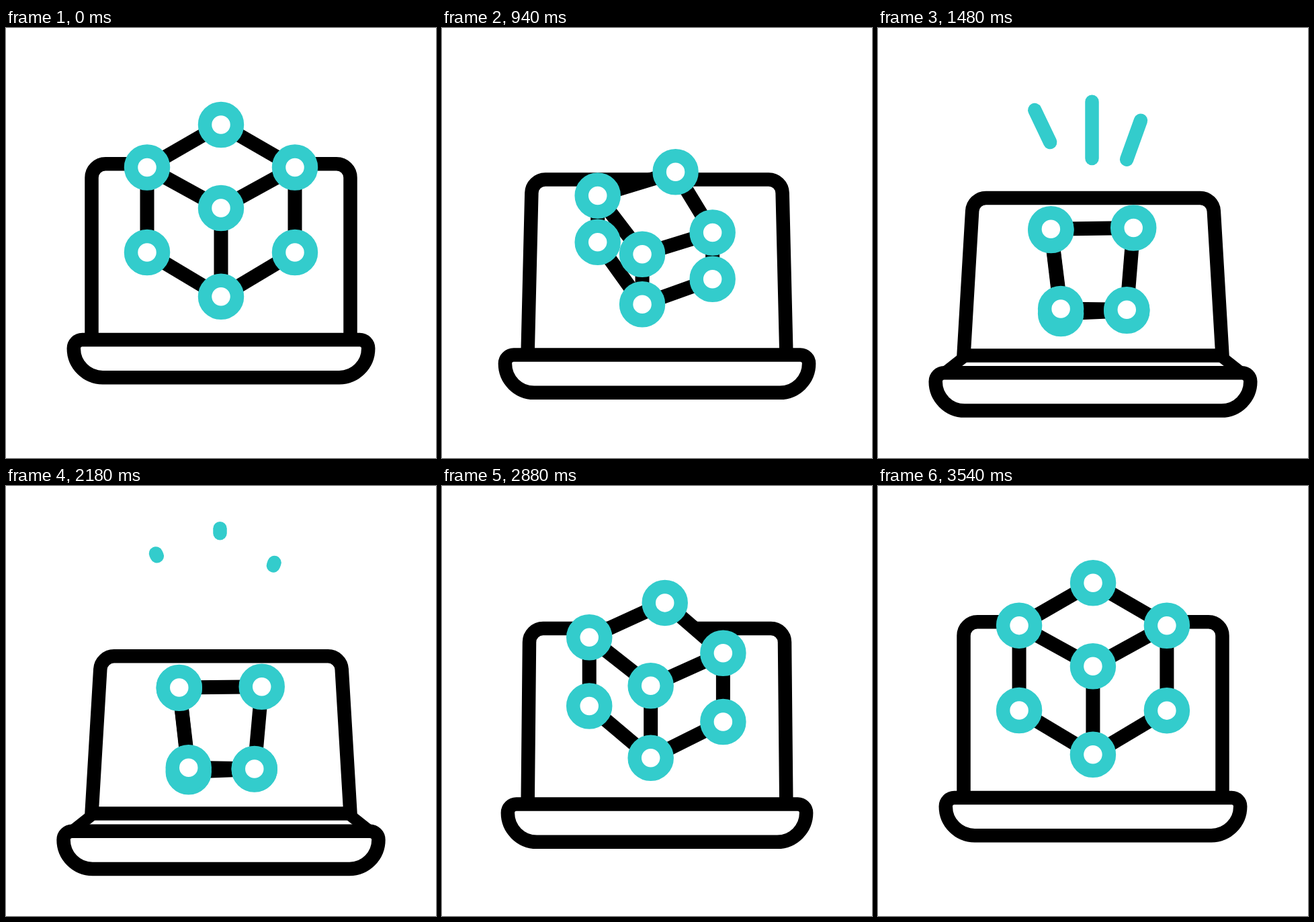
Write an HTML page with a canvas that moves like this. It is 640 by 640 pixels and loops after 3600 ms.

```html
<!DOCTYPE html>
<html lang="en">
<head>
<meta charset="utf-8">
<title>Laptop and cube network</title>
<style>
html, body { margin: 0; width: 100%; height: 100%; overflow: hidden; background: #fff; }
canvas { display: block; width: 640px; height: 640px; }
</style>
</head>
<body>
<canvas id="stage" width="640" height="640"></canvas>
<script>
const ctx = document.getElementById('stage').getContext('2d');
const LOOP = 3600, TURN = 1850, W = 20.5, TEAL = '#33cccc';

// Key poses of the tilt: [ms, amount]; the way back mirrors them at TURN
const KEYS = [
  [100, 0], [540, .057], [620, .0905], [820, .193],
  [940, .45], [1080, .757], [1480, .987], [TURN, 1.036]
];

// Rays: from x, y, to x, y, start time
const RAYS = [
  [256.3, 170.3, 223, 100.5, 1064],
  [318.5, 194.5, 318.5, 63.2, 1100],
  [370, 196, 399.5, 114, 1046]
];

const mix = (a, b, k) => a + (b - a) * k;
const clamp = v => Math.min(1, Math.max(0, v));
const smooth = u => u * u * (3 - 2 * u);

// Monotone cubic through the key poses
const slope = i => (KEYS[i + 1][1] - KEYS[i][1]) / (KEYS[i + 1][0] - KEYS[i][0]);
const tangents = KEYS.map((_, i) => {
  if (i === 0 || i === KEYS.length - 1) return 0;
  const a = slope(i - 1), b = slope(i);
  return 2 * a * b / (a + b);
});

function tiltAt(time) {
  const t = Math.max(KEYS[0][0], TURN - Math.abs(time - TURN));
  let i = 0;
  while (i < KEYS.length - 2 && t >= KEYS[i + 1][0]) i++;
  const [t0, v0] = KEYS[i], [t1, v1] = KEYS[i + 1];
  const d = t1 - t0, u = (t - t0) / d, w = 1 - u;
  return mix(v0, v1, smooth(u)) + d * u * w * (w * tangents[i] - u * tangents[i + 1]);
}

function line(x0, y0, x1, y1, width = W) {
  ctx.lineWidth = width;
  ctx.beginPath();
  ctx.moveTo(x0, y0);
  ctx.lineTo(x1, y1);
  ctx.stroke();
}

function laptop(p) {
  const lidX = mix(127.5, 141.5, p), lidY = mix(202.2, 253.6, p);
  const x = mix(100.8, 85.5, p), y = mix(464, 514, p);
  const hinge = 487.5, foot = y + 56.2;

  ctx.strokeStyle = '#000';
  ctx.lineCap = 'butt';
  line(128, 490, x + 12.5, y, 17);
  line(512, 490, 627.5 - x, y, 17);

  ctx.lineWidth = W;
  ctx.beginPath();
  ctx.moveTo(127.5, hinge);
  ctx.arcTo(lidX, lidY, 320, lidY, 20.5);
  ctx.arcTo(640 - lidX, lidY, 512.5, hinge, 20.5);
  ctx.lineTo(512.5, hinge);
  ctx.closePath();
  ctx.stroke();

  ctx.fillStyle = '#fff';
  ctx.beginPath();
  ctx.moveTo(320, y);
  ctx.arcTo(640 - x, y, 640 - x, foot, 12.8);
  ctx.arcTo(640 - x, foot, 320, foot, 43.2);
  ctx.arcTo(x, foot, x, y, 43.2);
  ctx.arcTo(x, y, 320, y, 12.8);
  ctx.closePath();
  ctx.fill();
  ctx.stroke();
}

function node(x, y) {
  ctx.beginPath();
  ctx.arc(x, y, 24, 0, 2 * Math.PI);
  ctx.fill();
  ctx.stroke();
}

// The cube is its upper face plus three corners straight below it
function cube(p) {
  const at = (x0, y0, x1, y1) => [mix(x0, x1, p), mix(y0, y1, p)];
  const top = at(320, 144, 381, 299.5);
  const left = at(210, 207.5, 258, 300.5);
  const right = at(430, 207.5, 369.5, 422);
  const centre = at(320, 268, 271.5, 420);
  const below = ([x, y], extra = 0) => [x, y + 126.5 * (1 - p) + extra];
  const face = [left, top, right, centre];
  const lower = [below(left), below(centre, 5.3), below(right)];

  ctx.fillStyle = '#fff';
  ctx.beginPath();
  for (const point of [left, top, right, ...lower.slice().reverse()]) ctx.lineTo(...point);
  ctx.fill();

  ctx.strokeStyle = '#000';
  const link = (a, b) => line(...a, ...b, 21);
  face.forEach((point, i) => link(point, face[(i + 1) % 4]));
  [left, centre, right].forEach((point, i) => link(point, lower[i]));
  link(lower[0], lower[1]);
  link(lower[1], lower[2]);

  ctx.strokeStyle = TEAL;
  ctx.lineWidth = W;
  for (const point of [...lower, ...face]) node(...point);
}

function rays(t) {
  const tail = smooth(clamp((t - 1450) / 850));
  ctx.strokeStyle = TEAL;
  ctx.lineCap = 'round';
  for (const [x0, y0, x1, y1, start] of RAYS) {
    const head = 1 - (1 - clamp((t - start) / 940)) ** 2;
    if (head <= tail) continue;
    line(mix(x0, x1, tail), mix(y0, y1, tail), mix(x0, x1, head), mix(y0, y1, head));
  }
}

function draw(t) {
  const p = tiltAt(t);
  ctx.fillStyle = '#fff';
  ctx.fillRect(0, 0, 640, 640);
  laptop(p);
  cube(p);
  rays(t);
}

const begin = performance.now();
function tick() {
  draw((performance.now() - begin) % LOOP);
  requestAnimationFrame(tick);
}
tick();
</script>
</body>
</html>
```
